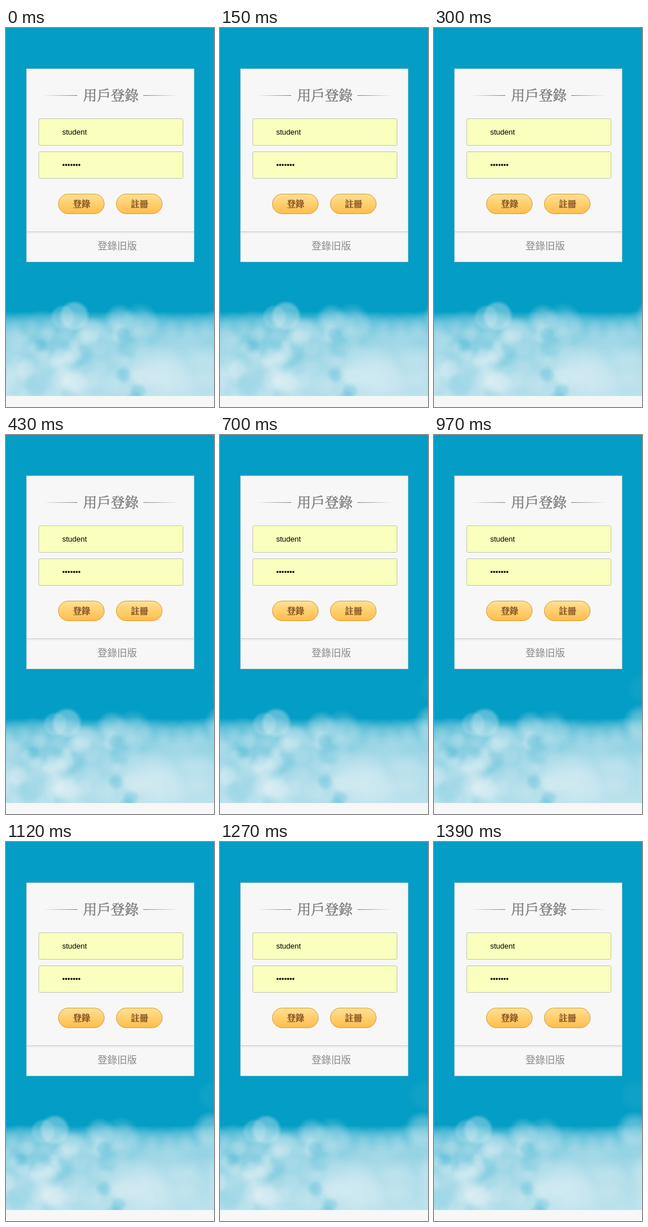
An HTML page with a canvas for the animation above (1.43 s loop, 359 px wide and 654 px high).

```html
<!DOCTYPE html>
<html lang="zh-Hant">
<head>
<meta charset="utf-8">
<style>
  html, body { margin: 0; width: 100%; height: 100%; overflow: hidden; background: #049dc5; }
  canvas, svg { position: absolute; left: 0; top: 0; display: block; }
  text { font-family: "Noto Serif CJK TC", "Noto Sans CJK TC", "Noto Sans CJK", serif; text-anchor: middle; }
  .title { font-size: 24px; fill: #7c7c7c; stroke: #7c7c7c; stroke-width: .5px; }
  .field { font: 13px Arial, "Liberation Sans", sans-serif; text-anchor: start; }
  .button { font-size: 15px; font-weight: bold; fill: #855526; stroke: #855526; stroke-width: .3px; }
  .link { font-family: "Noto Sans CJK TC", "Noto Sans CJK", sans-serif; font-size: 17px; font-weight: 300; fill: #888; }
</style>
</head>
<body>
<canvas id="stage" width="359" height="654"></canvas>
<svg width="359" height="654">
  <defs>
    <linearGradient id="fadeIn"><stop stop-color="#777" stop-opacity="0"/><stop offset="1" stop-color="#777"/></linearGradient>
    <linearGradient id="fadeOut"><stop stop-color="#777"/><stop offset="1" stop-color="#777" stop-opacity="0"/></linearGradient>
    <linearGradient id="gold" x2="0" y2="1"><stop stop-color="#ffe094"/><stop offset="1" stop-color="#ffbd4a"/></linearGradient>
    <linearGradient id="shade" x2="0" y2="1"><stop stop-color="#e9e9e9"/><stop offset="1" stop-color="#f7f7f7"/></linearGradient>
    <rect id="input" x="56.5" width="249" height="46" rx="2.5" fill="#faffbd" stroke="#c2c4b4"/>
    <rect id="pill" y="286.5" width="79" height="34" rx="17" fill="url(#gold)" stroke="#d99b30"/>
  </defs>
  <rect y="635" width="359" height="19" fill="#f7f7f7"/>

  <rect x="35.5" y="70.5" width="289" height="333" fill="#f7f7f7" stroke="#c9d0d2"/>
  <rect x="63" y="116" width="60" height="1" fill="url(#fadeIn)"/>
  <rect x="237" y="116" width="60" height="1" fill="url(#fadeOut)"/>
  <text class="title" x="181" y="125">用戶登錄</text>

  <use href="#input" y="156.5"/>
  <use href="#input" y="213.5"/>
  <text class="field" x="97" y="184">student</text>
  <text class="field" x="97" y="241">•••••••</text>

  <use href="#pill" x="90.5"/>
  <use href="#pill" x="190.5"/>
  <text class="button" x="130.5" y="309">登錄</text>
  <text class="button" x="230.5" y="309">註冊</text>

  <rect x="36" y="351" width="288" height="1" fill="#cacaca"/>
  <rect x="36" y="352" width="288" height="4" fill="url(#shade)"/>
  <text class="link" x="192" y="382">登錄旧版</text>
</svg>
<script>
const WIDTH = 359, TOP = 410, FLOOR = 635;
const STRIP = WIDTH + 50;
const MIST = '232,242,246', SKY = '4,157,197';

const view = document.getElementById('stage').getContext('2d');
const strip = document.createElement('canvas');
strip.width = STRIP;
strip.height = FLOOR;
const ctx = strip.getContext('2d');

let seed = 11;
const random = (lo, hi) => {
  seed = (seed * 16807) % 2147483647;
  return lo + (hi - lo) * seed / 2147483647;
};

function puff(x, y, r, alpha, color = MIST, core = 0.5) {
  const g = ctx.createRadialGradient(x, y, 0, x, y, r);
  g.addColorStop(0, `rgba(${color},${alpha})`);
  g.addColorStop(core, `rgba(${color},${alpha * 0.85})`);
  g.addColorStop(1, `rgba(${color},0)`);
  ctx.fillStyle = g;
  ctx.fillRect(x - r, y - r, 2 * r, 2 * r);
}

function drawClouds() {
  // Haze thickens towards the floor
  for (let y = 488; y < FLOOR; y++) {
    ctx.fillStyle = `rgba(${MIST},${0.78 * (1 - Math.exp((488 - y) / 38))})`;
    ctx.fillRect(0, y, STRIP, 1);
  }

  // Rolling crest, with a few taller heads
  for (let x = 0; x < STRIP; x += 30) puff(x, 518 + 4 * Math.cos(x / 24), 30, 0.2);
  puff(118, 497, 27, 0.42, MIST, 0.75);
  puff(98, 499, 22, 0.25, MIST, 0.75);
  puff(196, 502, 27, 0.35);
  puff(232, 506, 33, 0.25);
  puff(388, 497, 33, 0.4);
  puff(390, 438, 30, 0.06);

  // Broad smooth mass on the right, broken puffs on the left
  for (let i = 0; i < 22; i++) puff(random(245, 430), random(540, 640), random(34, 48), 0.16);
  for (let i = 0; i < 90; i++) {
    const dark = i % 6 === 0;
    puff(random(-10, 240), random(520, 640), random(10, 25), random(0.08, 0.22), dark ? SKY : MIST);
  }
  for (let i = 0; i < 14; i++) puff(random(90, 130), random(530, 620), random(14, 24), 0.16);
}

// The drift advances in eleven held poses
const LOOP = 1430, POSES = 11, SPEED = 0.0305;

function frame(now) {
  const pose = Math.floor((now % LOOP) / LOOP * POSES + 0.12);
  const held = Math.min(pose, POSES - 1) * 139;
  view.clearRect(0, TOP, WIDTH, FLOOR - TOP);
  view.drawImage(strip, -Math.round(held * SPEED), 0);
  requestAnimationFrame(frame);
}

drawClouds();
requestAnimationFrame(frame);
</script>
</body>
</html>
```
